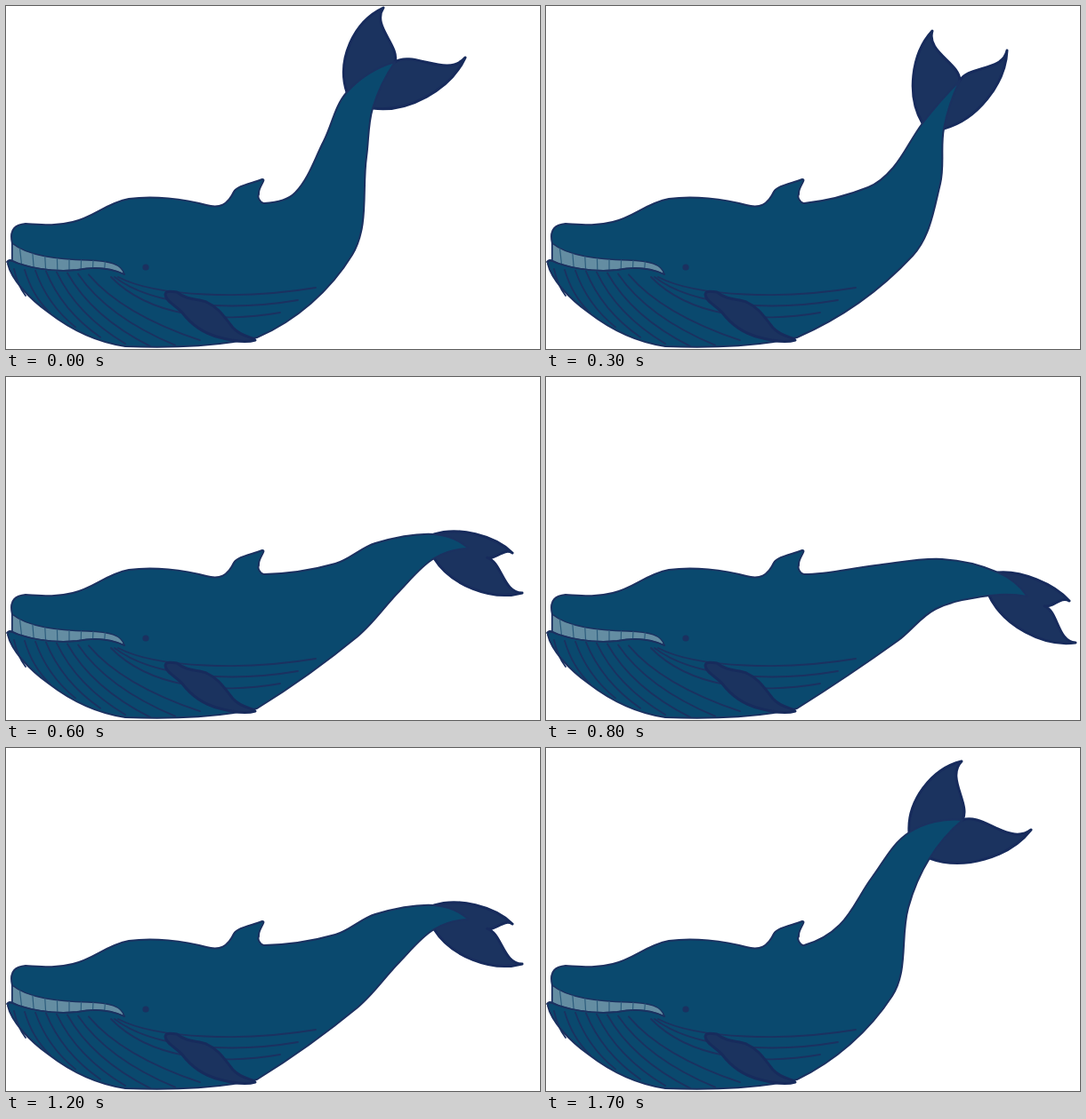
Write an HTML page that moves like this. It is 600 by 386 pixels and loops after 1800 ms.

```html
<!DOCTYPE html>
<html lang="en">
<head>
<meta charset="utf-8">
<title>Whale</title>
<style>
  html, body { margin: 0; width: 100%; height: 100%; overflow: hidden; background: #fff; }
  svg { display: block; width: 600px; height: 386px; }
  path { stroke-linecap: round; stroke-linejoin: round; }
  .skin { fill: #0a496e; stroke: #1b3160; stroke-width: 2; }
  .fin { fill: #1b335f; stroke: #172b5c; stroke-width: 3; }
  .line { fill: none; stroke: #1b3160; stroke-width: 1.8; }
  .teeth { fill: #648da2; stroke: #1b3160; stroke-width: 1.5; }
  .gap { fill: none; stroke: #2c5d7d; stroke-width: 1.2; clip-path: url(#mouth); }
</style>
</head>
<body>
<svg viewBox="0 0 600 386">
  <clipPath id="mouth"><path id="teeth" d="M7 267C25 282 60 285 92 286C116 287 130 290 133 302C116 294 100 293 80 297C50 300 20 293 7 287Z"/></clipPath>
  <path id="fluke" class="fin"/>
  <path id="body" class="skin"/>
  <path id="throat" class="line"/>
  <use href="#teeth" class="teeth"/>
  <path id="gaps" class="gap"/>
  <path class="line" d="M1 288C4 283 8 288 15 290C40 298 60 299 80 297C100 293 116 294 133 302"/>
  <circle cx="157" cy="294" r="3.6" fill="#1b3160"/>
  <path class="fin" d="M179 325C179 320 186 321 192 322C205 332 215 329 225 333C240 340 245 350 255 362C265 373 280 373 280 376C270 379 255 377 240 373C220 368 207 357 198 345C191 337 180 333 179 325Z"/>
</svg>
<script>
const STEP = 100, STEPS = 18;

// Step, then x,y of: two back points, upper root, tail tip, lower root,
// two underside points, upper and lower fluke tips
const POSES = [
  [0, 325,210, 357,152, 383,97, 437,63, 412,115, 405,170, 389,280, 424,2, 516,58],
  [1, 330,199, 366,146, 408,95, 468,81, 431,124, 407,180, 389,279, 467,15, 545,92],
  [3, 362,204, 390,182, 423,132, 465,84, 447,138, 443,200, 412,281, 434,28, 518,50],
  [6, 370,210, 415,187, 481,177, 520,193, 481,204, 442,241, 395,292, 569,198, 580,243],
  [8, 370,212, 445,205, 508,220, 541,247, 498,246, 438,261, 395,297, 588,252, 595,299]
];

const HEAD = 'M7 287L7 267C3 250 12 246 22 245C40 246 55 248 75 243C100 237 112 222 138 217' +
  'C165 213 200 217 225 224C240 228 249 224 256 209C260 202 275 200 288 195C293 195 283 204 284 212';
const BELLY = 'C245 382 190 385 134 383C100 378 70 362 48 345C26 329 6 308 2 290Q2 285 7 287Z';

const $ = id => document.getElementById(id);
const mix = (a, b, u) => a + (b - a) * u;
const clamp = v => Math.max(0, Math.min(1, v));
const angle = (a, b) => Math.atan2(b[1] - a[1], b[0] - a[0]);
const curve = (...nums) => 'C' + nums.map(v => v.toFixed(1)).join(' ');
const repeat = (n, f) => Array.from({ length: n }, (_, i) => f(i)).join('');

// Smooth curve through points; its ends continue as circular arcs
function spline(pts) {
  const last = pts.length - 1;
  const dirs = pts.map((p, i) => i && i < last ? angle(pts[i - 1], pts[i + 1]) : 0);
  dirs[0] = 2 * angle(pts[0], pts[1]) - dirs[1];
  dirs[last] = 2 * angle(pts[last - 1], pts[last]) - dirs[last - 1];
  return repeat(last, i => {
    const a = pts[i], b = pts[i + 1], r = Math.hypot(b[0] - a[0], b[1] - a[1]) / 3;
    return curve(
      a[0] + r * Math.cos(dirs[i]), a[1] + r * Math.sin(dirs[i]),
      b[0] - r * Math.cos(dirs[i + 1]), b[1] - r * Math.sin(dirs[i + 1]), ...b);
  });
}

// Curve from a to b whose handles stand off to the left by p and q chord lengths
function edge(a, b, p, q) {
  const dx = b[0] - a[0], dy = b[1] - a[1];
  return curve(
    a[0] + dx * 0.27 + dy * p, a[1] + dy * 0.27 - dx * p,
    b[0] - dx * 0.27 + dy * q, b[1] - dy * 0.27 - dx * q, ...b);
}

function poseAt(step) {
  const k = Math.min(POSES.findLastIndex(p => p[0] <= step), POSES.length - 2);
  const from = POSES[k], to = POSES[k + 1];
  const u = (step - from[0]) / (to[0] - from[0]);
  const flat = from.map((v, i) => mix(v, to[i], u)).slice(1);
  return flat.flatMap((v, i) => i % 2 ? [] : [[v, flat[i + 1]]]);
}

function draw(time) {
  const n = Math.floor(time / STEP) % STEPS;
  const step = Math.min(n, STEPS - n, 8.7);
  const [back1, back2, root1, tip, root2, under1, under2, fluke1, fluke2] = poseAt(step);

  // The notch slides out from behind the tail as the flukes drop
  const out = 0.38 * clamp((step - 3) / 3);
  const notch = tip.map((v, i) => mix(v, (fluke1[i] + fluke2[i]) / 2, out));
  const bulge = 0.24 - step * 0.013;

  $('body').setAttribute('d', HEAD + spline([[284, 212], [290, 222], back1, back2, root1, tip]) +
    spline([tip, root2, under1, under2, [282, 373]]) + BELLY);
  $('fluke').setAttribute('d', 'M' + root1 + edge(root1, fluke1, bulge, bulge) +
    edge(fluke1, notch, -0.28, 0.15) + edge(notch, fluke2, 0.15, -0.28) +
    edge(fluke2, root2, 0.2, 0.2) + 'Z');
}

// Pleats fan from the lip to the belly, then run along the flank
$('throat').setAttribute('d', repeat(8, i => {
  const x = 9 + 12 * i, y = 296 + i * 0.9;
  const endX = 22 + 28 * i, endY = 383 - 57 * (1 - i / 5.2) ** 2;
  return `M${x} ${y}Q${mix(x, endX, 0.3)} ${mix(y, endY, 0.6)} ${endX} ${endY}`;
}) + repeat(3, i => `M${126 - 4 * i} 305` +
  curve(170 - 5 * i, 328 + 10 * i, 270 - 18 * i, 330 + 14 * i, 348 - 20 * i, 317 + 14 * i)));
$('gaps').setAttribute('d', repeat(8, i => `M${15 + 14 * i} 268l${4 - i} 36`));

const start = performance.now();
function loop() {
  draw(performance.now() - start);
  requestAnimationFrame(loop);
}
loop();
</script>
</body>
</html>
```
